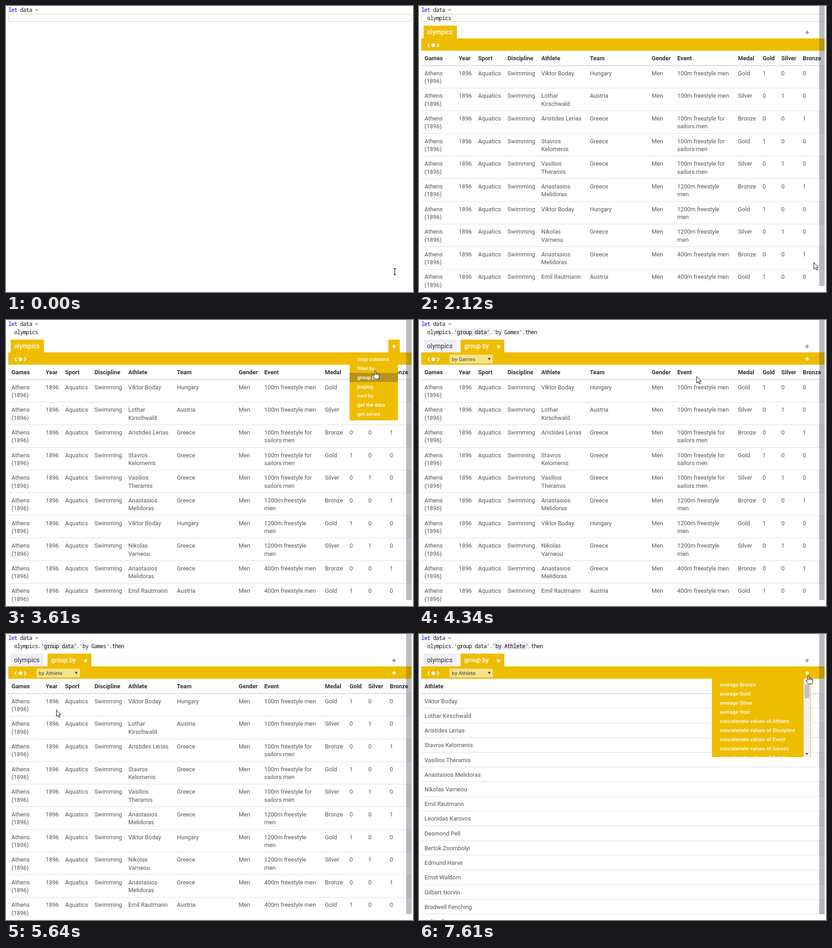
Recreate the animation shown at these times as an HTML page. Size 892 px wide and 627 px high, loop 8000 ms.

```html
<!DOCTYPE html>
<html lang="en">
<head>
<meta charset="utf-8">
<style>
html, body { margin: 0; width: 100%; height: 100%; overflow: hidden; background: #fff; }
svg { display: block; }
text { font: 12.8px Roboto, sans-serif; fill: #555; white-space: pre; }
.code { font: 12px "Noto Sans Mono", monospace; letter-spacing: -.7px; fill: #111; }
.head { font-weight: 700; fill: #333; }
.tab { font-size: 14px; fill: #333; }
.active { font-size: 13.8px; font-weight: 500; fill: #fff; }
.menu { font-size: 11.4px; font-weight: 500; fill: #fff; }
.option { font-size: 11.7px; fill: #444; }
</style>
</head>
<body>
<svg id="stage" width="892" height="627"></svg>
<script>
const LOOP = 8000, YELLOW = '#efbd00', PALE = '#eeeef5', CREAM = '#f5e38a';
const T = {
  type: [1030, 1090, 1150, 1310, 1400, 1490, 1580, 1670], table: 1760, bar: 1990,
  addMenu: 3220, hover: 3580, closeMenu: 3800, group: 3860, list: 4910, pick: 5640,
  recode: 5700, regroup: 5760, aggregate: 7510
};

const rect = (x, y, w, h, fill, extra = '') =>
  `<rect x="${x}" y="${y}" width="${w}" height="${h}" fill="${fill}" ${extra}/>`;
const text = (x, y, s, cls = '', extra = '') => `<text x="${x}" y="${y}" class="${cls}" ${extra}>${s}</text>`;
const path = (d, stroke, width = 2, extra = '') =>
  `<path d="${d}" fill="none" stroke="${stroke}" stroke-width="${width}" ${extra}/>`;
const plus = (x, y, color) => path(`M${x - 4} ${y}h8m-4-4v8`, color, 2.6);
const during = (from, to, markup) => `<g data-from="${from}" data-to="${to}">${markup}</g>`;
const each = (list, fn) => list.map(fn).join('');

// "|" marks where a name wraps in the narrow column
const names = ['Viktor Boday', 'Lothar|Kirschwald', 'Aristides Lerias', 'Stavros|Kelomenis', 'Vasilios|Theramis',
  'Anastasios|Melidoras', 'Nikolas|Varneou', 'Emil Rautmann', 'Leonidas Karovos', 'Desmond Pell',
  'Bertok Zsombolyi', 'Edmund Harve', 'Ernst Waldorn', 'Gilbert Norvin', 'Bradwell Fenching', 'Julien Dormesaux'];
const medals = ['Gold', 'Silver', 'Bronze'];
const columns = ['Games', 'Year', 'Sport', 'Discipline', 'Athlete', 'Team', 'Gender', 'Event', 'Medal', ...medals];
const columnX = [12, 87, 129.5, 194, 268, 374.5, 510, 566, 699, 753, 794, 841];
const events = ['100m freestyle men', '100m freestyle for|sailors men', '1200m freestyle|men', '400m freestyle men'];
const athleteOf = [0, 1, 2, 3, 4, 5, 0, 6, 5, 7], eventOf = [0, 0, 1, 1, 1, 2, 2, 2, 3, 3];
const teams = ['Hungary', 'Austria', 'Greece', 'Greece', 'Greece', 'Greece', 'Greece', 'Austria'];

function table(heads, rows, rowHeight) {
  const body = each(rows, (cells, i) => {
    const y = 131 + i * rowHeight;
    return (i % 2 ? '' : rect(877, y, 12, rowHeight, 'rgba(0,70,0,.05)')) +
      rect(5, y + rowHeight - 1, 884, 1, '#dcdcdc') +
      each(cells, (cell, c) => each(String(cell).split('|'), (line, n) =>
        text(columnX[c], y + 20.6 + n * 17.4, line)));
  });
  return each(heads, (h, c) => text(columnX[c], 118.8, h, 'head')) + rect(5, 129.5, 884, 2, '#d8d8de') + body;
}
const fullTable = table(columns, athleteOf.map((a, i) => ['Athens|(1896)', 1896, 'Aquatics', 'Swimming',
  names[a], teams[a], 'Men', events[eventOf[i]], medals[i % 3], ...medals.map((_, m) => +(m === i % 3))]), 49.65);
const athleteTable = table(['Athlete'], names.map(n => [n.replace('|', ' ')]), 32.23);

const typing = each(T.type, (from, i) => {
  const word = 'olympics'.slice(0, i + 1), to = T.type[i + 1] || T.group;
  return during(from, to, text(18, 30.5, word, 'code') + rect(10, 43, 24.5 + 6.93 * i, 29, YELLOW) +
    text(18, 62, word, 'active')) +
    during(from, Math.min(to, T.bar), rect(18.3 + 6.5 * (i + 1), 18, 1.6, 16, '#000'));
});

const groupCode = (key, markX) => rect(markX, 18, 79, 17, PALE) +
  text(18, 30.5, `olympics.'group data'.'by ${key}'.then`, 'code');

const toolbar = rect(5, 71, 884, 27, YELLOW) + path('M23 82l-3.5 4 3.5 4M40 82l3.5 4-3.5 4', '#fff') +
  '<circle cx="31.5" cy="86" r="4" fill="#fff"/>' + plus(850.5, 58, '#999');

const groupTab = rect(10, 43, 73, 28, PALE) + text(17.5, 62, 'olympics', 'tab') + rect(91, 43, 96, 29, YELLOW) +
  text(99.5, 62, 'group by', 'active') + path('M171.5 55.5l6 6m0-6l-6 6', '#fff', 2.4) + plus(850.5, 85.5, '#fff') +
  rect(67, 76, 95, 19, CREAM) + '<path d="M151 83h6l-3 5.5z" fill="#444"/>';

const actions = ['drop columns', 'filter by', 'group by', 'paging', 'sort by', 'get the data', 'get series'];
const addMenu = rect(838, 43, 25, 29, YELLOW) + plus(850.5, 58, '#fff') + rect(753, 71, 106, 149, YELLOW) +
  during(T.hover, T.closeMenu, rect(753, 116, 106, 20, '#b6921f')) +
  each(actions, (s, i) => text(770, 90 + i * 20.03, s, 'menu'));

const optionRow = (i, fill, color) => rect(68, 96 + i * 14.82, 93, 14.8, fill) +
  text(73, 107.2 + i * 14.82, 'by ' + columns[i], 'option', `style="fill:${color}"`);
const hoverStart = 5240, hoverStep = 60;
const optionList = rect(67.5, 76.5, 94, 18.5, 'none', 'stroke="#8b9a9a"') +
  rect(67.5, 95.5, 94, 178, CREAM, 'stroke="#6f8a94"') +
  each(columns, (_, i) => optionRow(i, CREAM, '#444')) +
  each([0, 1, 2, 3, 4], i => during(i ? hoverStart + (i - 1) * hoverStep : T.list,
    i < 4 ? hoverStart + i * hoverStep : T.pick, optionRow(i, '#1e90ff', '#fff')));

const aggregates = [...['Bronze', 'Gold', 'Silver', 'Year'].map(s => 'average ' + s),
  ...['Athlete', 'Discipline', 'Event', 'Games', 'Gender'].map(s => 'concatenate values of ' + s)];
const aggregateMenu = '<svg x="642" y="98" width="217" height="172">' + rect(0, 0, 217, 172, YELLOW) +
  each(aggregates, (s, i) => text(17.5, 16.5 + i * 20.03, s, 'menu')) + rect(201, 0, 15, 172, '#f0f0f3') +
  rect(203, 12, 11, 31, '#c1c1c4') + '<path d="M205 163h7l-3.5 4z" fill="#444"/></svg>';

const lineBox = rect(6, 18, 882.5, 16, 'none', 'stroke="#e3e3d3" stroke-width="1.6"');
const stage = document.getElementById('stage');
stage.innerHTML =
  during(1030, LOOP, rect(877, 0, 12, 614, PALE)) +
  during(0, T.addMenu, lineBox) +
  text(5, 13, '<tspan fill="#00f">let</tspan> data <tspan fill="#777">=</tspan>', 'code') +
  typing +
  during(2280, 2780, rect(70.3, 18, 1.6, 16, '#000')) +
  during(1030, LOOP, toolbar) +
  during(1030, T.table, rect(5, 206.5, 884, 2.6, YELLOW)) +
  during(T.table, T.regroup, fullTable) +
  during(T.regroup, LOOP, athleteTable) +
  during(T.group, LOOP, groupTab) +
  during(T.group, T.recode, groupCode('Games', 77)) +
  during(T.recode, LOOP, groupCode('Athlete', 162)) +
  during(T.group, T.pick, text(72, 90, 'by Games', 'option')) +
  during(T.pick, LOOP, text(72, 90, 'by Athlete', 'option')) +
  rect(877, 0, 12, 614, 'rgba(40,40,40,.25)', 'id="thumb"') +
  during(T.addMenu, T.closeMenu, addMenu) +
  during(T.list, T.pick, optionList) +
  during(T.aggregate, LOOP, aggregateMenu) +
  `<g id="pointer">
    <g id="beam">${path('M-3-7h2.2l.8.8.8-.8H3M0-6V6M-3 7h2.2l.8-.8.8.8H3', '#000', 1.2)}</g>
    <path id="arrow" d="M.5.5v14.2l3.3-3 2.3 5.3 2.3-1-2.3-5.2h4.4z" fill="#fff" stroke="#000"/>
    <path id="hand" d="M-1.5 10V1.5Q0-.5 1.5 1.5V6q1.5-1 2.7.5 1.6-.8 2.6.8 1.7-.5 2.2 1.2v4.5L7.5 18.5H-.5L-5 12.5q-1-2.5 1-2.5z
      M1.5 6v4M4.2 6.8V10M6.8 7.6V10.5" fill="#fff" stroke="#000"/>
  </g>`;

// pointer travel: start, end, from x, y, to x, y
const moves = [
  [1990, 2110, 852, 575, 865, 562],
  [2480, 3130, 865, 562, 852, 56],
  [3520, 3650, 852, 56, 805, 126],
  [4250, 4820, 804, 126, 137, 87],
  [5210, 5480, 137, 87, 110, 166],
  [6090, 6890, 110, 166, 854, 91]
];
const shapes = [[0, 'beam'], [1990, 'arrow'], [3130, 'hand'], [4250, 'arrow'], [7450, 'hand']];
const timed = [...stage.querySelectorAll('[data-from]')];
const [pointer, thumb] = ['pointer', 'thumb'].map(id => document.getElementById(id));

function pointerAt(t) {
  if (t < moves[0][0]) return [852, 582.5];
  const [start, end, x0, y0, x1, y1] = moves.filter(m => m[0] <= t).pop();
  const p = Math.min(1, (t - start) / (end - start));
  return [x0 + (x1 - x0) * p * (2 - p), y0 + (y1 - y0) * p * p * (3 - 2 * p)];
}

function render(now) {
  const t = now % LOOP;
  for (const g of timed) g.style.display = t >= g.dataset.from && t < g.dataset.to ? '' : 'none';
  thumb.style.opacity = Math.max(0, Math.min(1, (t - T.bar) / 100));
  const shape = shapes.filter(s => s[0] <= t).pop()[1];
  for (const el of pointer.children) el.style.display = el.id === shape ? '' : 'none';
  pointer.setAttribute('transform', `translate(${pointerAt(t)})`);
}

const begin = performance.now();
function tick() {
  render(performance.now() - begin);
  requestAnimationFrame(tick);
}
tick();
</script>
</body>
</html>
```
